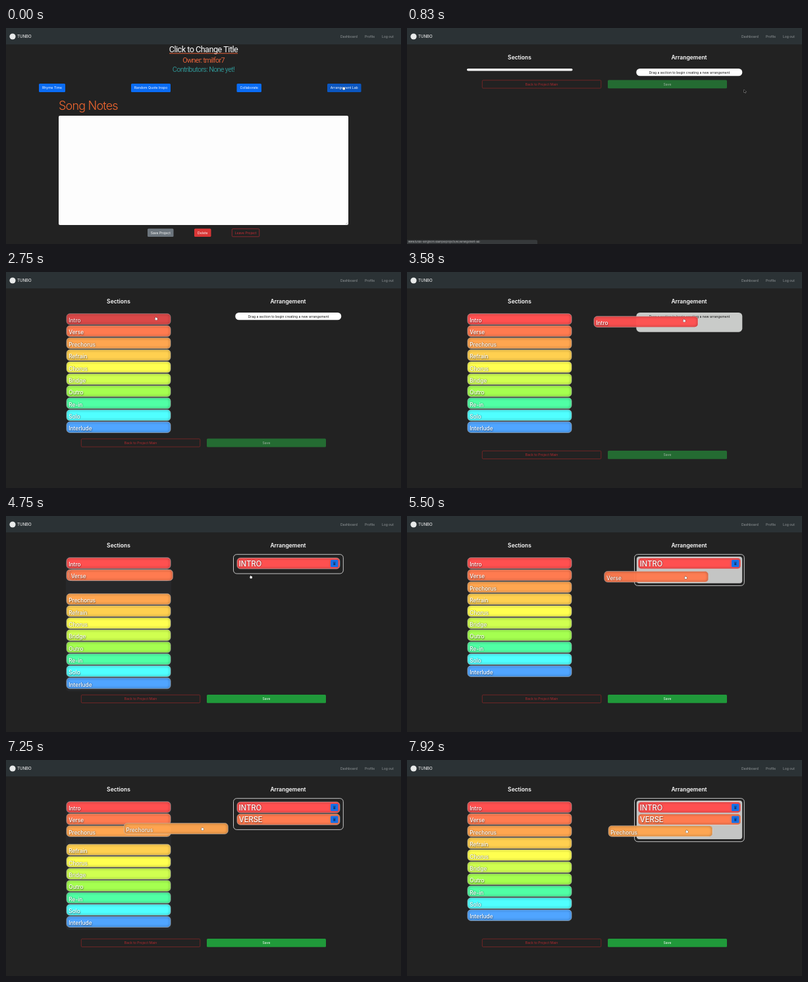
These frames come from a looping animation (600x330 px, 8000 ms). An HTML page with a canvas:

```html
<!DOCTYPE html>
<html lang="en">
<head>
<meta charset="utf-8">
<title>Arrangement lab</title>
<style>
html, body { margin: 0; width: 100%; height: 100%; overflow: hidden; background: #222; }
canvas { display: block; width: 600px; height: 330px; }
</style>
</head>
<body>
<canvas id="stage"></canvas>
<script>
const LOOP = 8000, PAGE_SWAP = 450, STATUS_OFF = 1050, LOADED = 1250, SETTLE = 170;
const SANS = 'Inter, "Noto Sans", sans-serif';
const NARROW = 'Roboto, "Open Sans", sans-serif';
const PITCH = 18.35, LIST_X = 92, LIST_Y = 63.7, SLOT_X = 351;

const SECTIONS = [
  ['Intro', '#ff5050'], ['Verse', '#ff7b50'], ['Prechorus', '#ffa650'],
  ['Refrain', '#ffd050'], ['Chorus', '#ffff50'], ['Bridge', '#d0ff50'],
  ['Outro', '#a5ff50'], ['Re-in', '#50ffa5'], ['Solo', '#50ffff'], ['Interlude', '#50a5ff']
];

// Section index, then grab, enter and release times; lag delays the dragged bar
const DRAGS = [
  { item: 0, grab: 2900, enter: 3250, drop: 3830, lag: 0 },
  { item: 1, grab: 4600, enter: 4950, drop: 5880, lag: 138 },
  { item: 2, grab: 6900, enter: 7600, drop: Infinity, lag: 0 }
];

// Pointer path: time, x, y
const PATH = [
  [0, 513, 92], [450, 513, 92], [830, 512, 94], [1500, 513, 95], [1670, 502, 90],
  [2350, 236, 65], [2750, 228, 71], [2900, 229, 70], [3330, 395, 61], [3580, 421, 74],
  [3830, 428, 73], [4170, 420, 80], [4500, 214, 91], [4600, 214, 92], [4750, 372, 93],
  [5080, 420, 95], [5880, 426, 93], [6100, 421, 95], [6500, 217, 119], [6720, 211, 109],
  [6900, 211, 109], [7400, 322, 104], [7920, 425, 109], [8000, 427, 109]
];

const canvas = document.getElementById('stage');
const ctx = canvas.getContext('2d');
const ratio = window.devicePixelRatio || 1;
canvas.width = 600 * ratio;
canvas.height = 330 * ratio;

const clamp = v => Math.max(0, Math.min(1, v));
const ease = v => { v = clamp(v); return v * v * (3 - 2 * v); };
const mix = (a, b, k) => a + (b - a) * k;

function pointer(t) {
  let i = 1;
  while (i < PATH.length - 1 && PATH[i][0] < t) i++;
  const a = PATH[i - 1], b = PATH[i];
  const k = ease((t - a[0]) / (b[0] - a[0]));
  return { x: mix(a[1], b[1], k), y: mix(a[2], b[2], k) };
}

function box(x, y, w, h, r, fill, stroke, line = 0.7) {
  ctx.beginPath();
  ctx.roundRect(x, y, w, h, r);
  if (fill) { ctx.fillStyle = fill; ctx.fill(); }
  if (stroke) { ctx.strokeStyle = stroke; ctx.lineWidth = line; ctx.stroke(); }
}

function label(str, x, y, size, color, { align = 'left', weight = 400, font = SANS, gap = 0 } = {}) {
  ctx.font = `${weight} ${size}px ${font}`;
  ctx.letterSpacing = gap + 'px';
  ctx.textAlign = align;
  ctx.textBaseline = 'alphabetic';
  ctx.fillStyle = color;
  ctx.fillText(str, x, y);
}

function button(str, x, y, w, h, fill, color, stroke) {
  box(x, y, w, h, 1.5, fill, stroke);
  label(str, x + w / 2, y + h / 2 + 1.9, 5.1, color, { align: 'center' });
}

function navbar() {
  ctx.fillStyle = '#2b3235';
  ctx.fillRect(0, 0, 600, 25);
  ctx.fillStyle = '#e8eaea';
  ctx.beginPath();
  ctx.arc(10, 13, 4.6, 0, 7);
  ctx.fill();
  label('TUNBO', 17, 15.3, 6.1, '#fff');
  label('Dashboard', 508, 15, 5, '#94999b');
  label('Profile', 545, 15, 5, '#94999b');
  label('Log out', 571, 15, 5, '#94999b');
}

function projectPage() {
  const mid = { align: 'center', font: NARROW };
  label('Click to Change Title', 300, 37, 12.6, '#fff', { ...mid, gap: -0.5 });
  ctx.fillStyle = '#e5623a';
  ctx.fillRect(248, 38.3, 104, 1);
  label('Owner: tmilfor7', 300, 52.5, 10.8, '#e5623a', { ...mid, gap: -0.7 });
  label('Contributors: None yet!', 300, 66.5, 10.8, '#2f8f8f', { ...mid, gap: -0.7 });

  button('Rhyme Time', 50, 85, 40, 13, '#0a6cf5', '#fff');
  button('Random Quote Inspo', 190, 85, 60, 13, '#0a6cf5', '#fff');
  button('Collaborate', 350.5, 85, 37.5, 13, '#0a6cf5', '#fff');
  button('Arrangement Lab', 488, 85, 51.5, 13, '#0b56c0', '#fff');

  label('Song Notes', 80, 124.5, 18, '#f0662f', { weight: 300, gap: -0.8 });
  box(80, 134, 440, 167, 2, '#fdfdfd');
  ctx.strokeStyle = '#888';
  ctx.lineWidth = 0.5;
  ctx.beginPath();
  ctx.moveTo(516, 300); ctx.lineTo(519, 297);
  ctx.moveTo(518, 300); ctx.lineTo(519, 299);
  ctx.stroke();

  button('Save Project', 215, 306.5, 39.5, 12.5, '#6c757d', '#fff');
  button('Delete', 286, 306.5, 25.5, 12.5, '#d93636', '#fff');
  button('Leave Project', 343.3, 306.8, 41.5, 12, null, '#cc2c36', '#b52a34');
}

// Coloured bar with a soft dark inner edge and a pale rim
function bar(x, y, w, color) {
  const h = 16.6;
  box(x, y, w, h, 5, color);
  ctx.save();
  ctx.clip();
  ctx.shadowColor = 'rgba(0,0,0,.65)';
  ctx.shadowBlur = 4 * ratio;
  ctx.beginPath();
  ctx.roundRect(x - 1, y - 1, w + 2, h + 2, 6);
  ctx.lineWidth = 2;
  ctx.strokeStyle = 'rgba(0,0,0,.75)';
  ctx.stroke();
  ctx.restore();
  box(x, y, w, h, 5, null, 'rgba(255,255,255,.5)', 0.8);
}

function barText(str, x, y, size) {
  ctx.save();
  ctx.shadowColor = 'rgba(0,0,0,.6)';
  ctx.shadowBlur = 1.5 * ratio;
  ctx.shadowOffsetX = ctx.shadowOffsetY = 0.5 * ratio;
  label(str, x, y, size, '#fff', { weight: 500 });
  ctx.restore();
}

function section(i, x, y, alpha = 1) {
  const [name, color] = SECTIONS[i];
  ctx.save();
  ctx.globalAlpha = alpha;
  bar(x, y, 158, color);
  barText(name, x + 3.3, y + 13.4, 8.3);
  ctx.restore();
}

function slot(i, row) {
  const y = LIST_Y + 0.4 + row * PITCH;
  bar(SLOT_X, y, 156, SECTIONS[i][1]);
  barText(SECTIONS[i][0].toUpperCase(), SLOT_X + 2.7, y + 12.7, 11.2);
  box(493, y + 3, 11.5, 10.8, 1.5, '#1670e6');
  ctx.fillStyle = '#123a78';
  ctx.fillRect(496.8, y + 6.2, 4, 0.8);
  ctx.fillRect(497.3, y + 7.5, 3, 3.4);
}

function dragPose(d, t) {
  const hold = Math.min(t, d.drop);
  const from = pointer(d.grab), at = pointer(Math.max(d.grab, hold - d.lag));
  const k = ease((t - d.drop) / SETTLE);
  const homeY = LIST_Y + d.item * PITCH;
  return {
    x: mix(LIST_X + at.x - from.x, SLOT_X, k),
    y: mix(homeY + at.y - from.y, homeY, k)
  };
}

function sectionList(t, drag, pose) {
  if (t < LOADED) {
    box(91, 62, 160.5, 3.6, 1.8, '#fff');
    return;
  }
  const gap = drag ? 1 - ease((pose.x - LIST_X - 50) / 80) : 0;
  if (gap > 0) box(91, 62, 160, 4 + PITCH * (10 + gap), 5, '#27282a');
  const p = pointer(t);
  const inside = p.x > LIST_X && p.x < LIST_X + 158;
  const hover = !drag && inside ? Math.floor((p.y - 63.5) / PITCH) : -1;
  SECTIONS.forEach((s, i) => {
    const shift = drag && i > drag.item ? gap : 0;
    section(i, LIST_X, LIST_Y + (i + shift) * PITCH, i === hover ? 0.83 : 1);
  });
}

function arrangement(t, placed, drag) {
  const over = drag && t >= drag.enter;
  const room = over ? ease((t - drag.enter) / 120) : 0;
  const rows = placed.length + room;
  if (!placed.length) {
    box(348.3, 62, 161, 11.3 + PITCH * room, 5.5, over ? '#c9cbc9' : '#fff');
    label('Drag a section to begin creating a new arrangement', 429, 69.6, 5, '#111', { align: 'center' });
    return;
  }
  box(345.5, 58.7, 166.8, 11 + PITCH * rows, 5, null, '#d8d8d8', 0.9);
  if (over) box(348.8, 62, 160.4, 4 + PITCH * rows, 4, '#c4c5c4');
  placed.forEach((d, row) => slot(d.item, row));
}

function labPage(t) {
  const drag = DRAGS.find(d => t >= d.grab && t < d.drop + SETTLE);
  const placed = DRAGS.filter(d => t >= d.drop + SETTLE);
  const pose = drag && dragPose(drag, t);
  const head = { align: 'center', weight: 600 };
  label('Sections', 171, 48.3, 8.5, '#fff', head);
  label('Arrangement', 428.5, 48.3, 8.5, '#fff', head);

  sectionList(t, drag, pose);
  arrangement(t, placed, drag);

  const y = t < LOADED ? 79.5 : drag ? 273 : 254.6;
  const ready = placed.length > 0;
  button('Back to Project Main', 114.3, y + 0.3, 180.5, 12.2, null, '#b32a2e', '#8f2828');
  button('Save', 305, y, 181, 12.8, ready ? '#20993a' : '#246b32', ready ? '#fff' : '#a9b8ab');

  if (pose) section(drag.item, pose.x, pose.y, 0.97);
  if (t < STATUS_OFF) {
    box(0, 323.7, 198, 6.3, [0, 2, 0, 0], '#36393b');
    label('www.tunbo-songroom.example/projects/80/arrangement-lab', 2, 328.3, 3.75, '#c4c6c7');
  }
}

function drawPointer(t) {
  const { x, y } = pointer(t);
  ctx.save();
  ctx.translate(x, y);
  ctx.lineWidth = 0.6;
  ctx.beginPath();
  if (t >= PAGE_SWAP && t < 2250) {
    ctx.moveTo(0, 0);
    [[0, 4.6], [1.1, 3.7], [1.9, 5.3], [2.7, 4.9], [2, 3.4], [3.4, 3.3]].forEach(p => ctx.lineTo(...p));
    ctx.closePath();
    ctx.fillStyle = '#111';
    ctx.strokeStyle = '#ddd';
  } else {
    ctx.roundRect(-1.6, -1, 3.6, 3.4, 1.2);
    ctx.roundRect(-0.9, -2, 1.1, 2.4, 0.5);
    ctx.fillStyle = '#f4f4f4';
    ctx.strokeStyle = '#222';
  }
  ctx.stroke();
  ctx.fill();
  ctx.restore();
}

function frame() {
  const t = performance.now() % LOOP;
  ctx.setTransform(ratio, 0, 0, ratio, 0, 0);
  ctx.fillStyle = '#222';
  ctx.fillRect(0, 0, 600, 330);
  navbar();
  if (t < PAGE_SWAP) projectPage();
  else labPage(t);
  drawPointer(t);
  requestAnimationFrame(frame);
}
requestAnimationFrame(frame);
</script>
</body>
</html>
```
